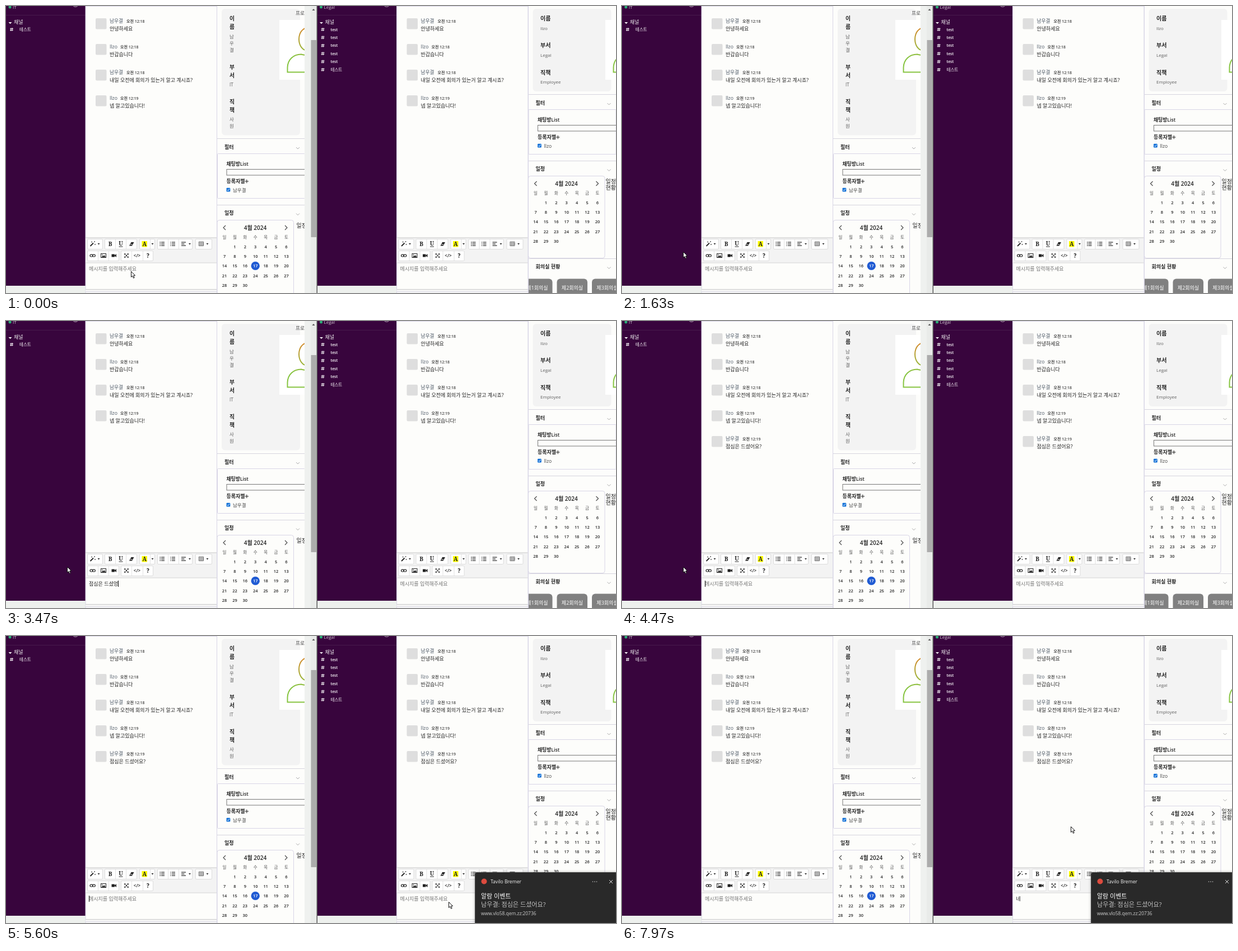
Write an HTML page with a canvas that moves like this. It is 1089 by 514 pixels and loops after 8000 ms.

```html
<!DOCTYPE html>
<html lang="ko">
<head>
<meta charset="utf-8">
<style>
html, body { margin: 0; width: 100%; height: 100%; overflow: hidden; background: #fdfdfb; }
canvas { display: block; width: 1089px; height: 514px; }
</style>
</head>
<body>
<canvas id="stage" width="1089" height="514"></canvas>
<script>
const c = document.getElementById('stage').getContext('2d');
const FONT = '"Open Sans","Noto Sans CJK KR","Noto Sans CJK",sans-serif';
const LOOP = 8000, SHIFT = 555.5, BLINK = 530;
const KIM = '남우결', GUEST = 'Ilzo';
const INK = '#222', GREY = '#606060', EDGE = '#d8d5e6', PAPER = '#fdfdfb';
const SENT = 4150, TOAST = 4520, REFOCUS = 5690;

const DRAFT = ['ㅈ', '저', '점', '점ㅅ', '점시', '점심', '점심ㅇ', '점심으', '점심은', '점심은 ',
  '점심은 ㄷ', '점심은 드', '점심은 듯', '점심은 드셔', '점심은 드셨', '점심은 드셨ㅇ',
  '점심은 드셨어', '점심은 드셨엉', '점심은 드셨어요', '점심은 드셨어요?'];
const TYPE_START = 1980, TYPE_STEP = 84;

const CHAT = [
  [KIM, '오전 12:18', '안녕하세요'],
  [GUEST, '오전 12:18', '반갑습니다'],
  [KIM, '오전 12:18', '내일 오전에 회의가 있는거 알고 계시죠?'],
  [GUEST, '오전 12:19', '넵 알고있습니다!'],
  [KIM, '오전 12:19', '점심은 드셨어요?']
];

// time, x, y of the pointer tip
const PATH = [
  [250, 223, 475], [900, 109, 440], [4540, 109, 440], [4690, 463, 431], [4730, 512, 427],
  [5100, 750, 470], [5400, 790, 476], [5780, 790, 476], [6120, 801, 341]
];

function text(s, x, y, size, color = INK, weight = 400, align = 'left') {
  c.font = `${weight} ${size}px ${FONT}`;
  c.textAlign = align;
  c.fillStyle = color;
  c.fillText(s, x, y + size * 0.37);
}

function rect(x, y, w, h, color) {
  c.fillStyle = color;
  c.fillRect(x, y, w, h);
}

function box(x, y, w, h, r, fill, stroke) {
  c.beginPath();
  c.roundRect(x, y, w, h, r);
  if (fill) { c.fillStyle = fill; c.fill(); }
  if (stroke) { c.strokeStyle = stroke; c.lineWidth = 1; c.stroke(); }
}

function disc(x, y, r, color) {
  c.beginPath();
  c.arc(x, y, r, 0, Math.PI * 2);
  c.fillStyle = color;
  c.fill();
}

function trace(points, closed) {
  c.beginPath();
  for (let i = 0; i < points.length; i += 2) c.lineTo(points[i], points[i + 1]);
  if (closed) c.closePath();
}

function stroke(points, color = INK, width = 1) {
  trace(points);
  c.strokeStyle = color;
  c.lineWidth = width;
  c.stroke();
}

function fill(points, color = INK) {
  trace(points, true);
  c.fillStyle = color;
  c.fill();
}

function clipped(x, y, w, h, draw) {
  c.save();
  c.beginPath();
  c.rect(x, y, w, h);
  c.clip();
  draw();
  c.restore();
}

const caretDown = (x, y) => fill([x - 2, y - 1, x + 2, y - 1, x, y + 1.5]);
const chevron = (x, y) => stroke([x - 3, y - 1.5, x, y + 1.5, x + 3, y - 1.5], '#aaa');

function hash(x, y) {
  stroke([x - 0.8, y - 3, x - 1.6, y + 3], '#fff', 0.9);
  stroke([x + 1.6, y - 3, x + 0.8, y + 3], '#fff', 0.9);
  stroke([x - 2.8, y - 1.3, x + 3, y - 1.3], '#fff', 0.9);
  stroke([x - 3, y + 1.3, x + 2.8, y + 1.3], '#fff', 0.9);
}

function sidebar(team, channels) {
  rect(0, 0, 142, 501, '#38053d');
  rect(0, 501, 142, 13, '#edf0ed');
  rect(0, 16, 142, 1, '#471a4c');
  disc(7, 2, 2.5, '#2bac76');
  text(team, 12, 2, 8, '#cfc3cf');
  c.beginPath();
  c.arc(124, -4, 5.5, 0, Math.PI);
  c.strokeStyle = '#b9a8bb';
  c.lineWidth = 1;
  c.stroke();
  fill([4.5, 29, 10.5, 29, 7.5, 32], '#fff');
  text('채널', 14, 28.5, 9, '#eee');
  channels.forEach((name, i) => {
    const y = 42 + i * 14.4;
    hash(10, y);
    text(name, 24, y, name === 'test' ? 6.8 : 7.5, '#fff', name === 'test' ? 600 : 500);
  });
}

function lines(x, y, gap, dotted) {
  for (let i = -1; i < 2; i++) {
    const left = dotted ? x - 2 : x - 4;
    rect(left, y + i * 3 - 0.5, dotted ? 6 : i ? 8 : 5.5, 1.2, INK);
    if (dotted) rect(x - 4.5, y + i * 3 - 0.6, gap, 1.4, INK);
  }
}

function toolbar() {
  rect(142, 415, 234, 45, '#f3f3f3');
  rect(142, 414.5, 234, 1, '#c8c8c8');
  rect(142, 459.5, 234, 1, '#d6d6d6');
  const groups = [[145, 28, 417], [176, 58, 417], [238, 28, 417], [270, 63, 417], [338, 30, 417],
    [145, 57, 438], [205, 58, 438]];
  for (const [x, w, y] of groups) box(x + 0.5, y + 0.5, w - 1, 18, 1.5, '#fff', '#dcdcdc');
  for (const x of [195.5, 214.5, 257.5, 289.5, 308.5]) rect(x - 0.5, 418, 1, 17, '#e2e2e2');
  for (const x of [164, 183, 224, 244]) rect(x, 439, 1, 17, '#e2e2e2');
  for (const x of [165.5, 261.5, 328, 359.5]) caretDown(x, 426);

  stroke([150.5, 430, 156, 424.5], INK, 1.8);
  for (const [x, y] of [[153, 422.5], [158, 422], [159, 427]]) rect(x - 0.7, y - 0.7, 1.5, 1.5, INK);
  c.textAlign = 'center';
  c.fillStyle = INK;
  c.font = 'bold 10px "Noto Serif","Liberation Serif",serif';
  c.fillText('B', 186, 429.7);
  c.fillText('U', 205, 429.2);
  rect(201.5, 430.5, 7, 1, INK);
  fill([220, 429.5, 223.5, 423, 228.5, 423, 225, 429.5]);
  stroke([222, 427, 225.5, 427], '#fff', 1);
  rect(242.5, 421, 9.5, 10.5, '#ffff00');
  c.fillStyle = INK;
  c.fillText('A', 247.2, 430);
  lines(279, 426, 1.5, true);
  lines(298, 426, 1.1, true);
  lines(317, 426, 0, false);
  c.strokeStyle = '#444';
  c.lineWidth = 0.8;
  c.strokeRect(344.5, 422.5, 8, 7);
  stroke([344.5, 425, 352.5, 425, 352.5, 427.3, 344.5, 427.3], '#444', 0.6);
  stroke([347.2, 422.5, 347.2, 429.5], '#444', 0.6);
  stroke([349.9, 422.5, 349.9, 429.5], '#444', 0.6);

  for (const x of [150, 154.3]) {
    c.beginPath();
    c.roundRect(x, 445.2, 5, 3.8, 1.9);
    c.strokeStyle = INK;
    c.lineWidth = 1.2;
    c.stroke();
  }
  c.lineWidth = 1;
  c.strokeRect(169.5, 443.5, 9, 7);
  fill([170.5, 449.7, 173, 446.5, 174.5, 448, 176, 446, 177.8, 449.7]);
  disc(172, 445.5, 0.8, INK);
  rect(188.5, 444.5, 5.5, 5, INK);
  fill([193.5, 447, 197, 444, 197, 450]);
  stroke([212, 444, 218, 450], INK, 1);
  stroke([218, 444, 212, 450], INK, 1);
  for (const sx of [-1, 1]) for (const sy of [-1, 1]) {
    const x = 215 + sx * 3.8, y = 447 + sy * 3.8;
    fill([x, y, x - sx * 2.8, y, x, y - sy * 2.8]);
  }
  text('</>', 234, 447, 8, INK, 600, 'center');
  text('?', 253.5, 447, 10, INK, 700, 'center');
}

function chat(count, draft, caretOn) {
  rect(142, 0, 235, 514, PAPER);
  rect(142, 0, 235, 1, EDGE);
  rect(141.5, 0, 1, 514, EDGE);
  CHAT.slice(0, count).forEach(([name, time, body], i) => {
    const y = i * 46;
    box(160, 22 + y, 19.5, 19.5, 2, '#dedede');
    text(name, 185, 26.5 + y, 8.7, '#4c5866');
    text(time, name === KIM ? 215 : 204, 27 + y, 7, '#444', 600);
    text(body, 185, 40.5 + y, 9, INK);
  });
  toolbar();
  text(draft || '메시지를 입력해주세요', 148, 470.5, 9, draft ? INK : '#757575');
  if (caretOn) {
    const w = draft ? c.measureText(draft).width : 0;
    rect(Math.round(148 + w), 465, 1, 11, '#000');
  }
  rect(142, 507, 235, 1, '#ccc');
  rect(142, 508, 235, 4, '#f4f4f4');
  rect(142, 511.5, 235, 1, EDGE);
  rect(376, 0, 1, 514, EDGE);
}

function avatar(dx) {
  c.save();
  c.translate(dx, 0);
  rect(488, 25, 107, 107, '#fff');
  const g = c.createLinearGradient(0, 39, 0, 92);
  g.addColorStop(0, '#d58a2c');
  g.addColorStop(1, '#86c440');
  c.strokeStyle = g;
  c.lineWidth = 2;
  c.beginPath();
  c.ellipse(537, 59.5, 14, 20, 0, 0, Math.PI * 2);
  c.stroke();
  c.beginPath();
  c.moveTo(570, 118.5);
  c.lineTo(502.5, 118.5);
  c.lineTo(502.5, 110);
  c.bezierCurveTo(503, 96, 513, 86.5, 527, 86.5);
  c.quadraticCurveTo(531, 88, 537, 88);
  c.stroke();
  c.restore();
}

function calendar(today, hover) {
  box(377, 383.5, 136.5, 147, 4, PAPER, EDGE);
  text('4월 2024', 445, 397, 10, INK, 600, 'center');
  stroke([392, 393, 388, 397, 392, 401], '#444', 1.1);
  stroke([498, 393, 502, 397, 498, 401], '#444', 1.1);
  const colX = i => 390 + i * 18.4;
  [...'일월화수목금토'].forEach((d, i) => text(d, colX(i), 414, 7.5, '#555', 400, 'center'));
  for (let d = 1; d <= 30; d++) {
    const x = colX(d % 7), y = 431 + Math.floor(d / 7) * 17.35;
    if (d === today) disc(x, y - 0.3, 7.7, '#205bd3');
    else if (d === hover) disc(x, y - 0.3, 7.7, '#e9e9ee');
    text(d, x, y, 7.4, d === today ? '#fff' : INK, 600, 'center');
  }
}

function panel(user, today, hover) {
  for (const y of [237, 356, 531]) rect(377, y, 200, 1, '#d6d4de');
  for (const [s, y] of [['필터', 252.5], ['일정', 371], ['회의실 현황', 546]]) {
    text(s, 390, y, 9, INK, 600);
    chevron(521, y + 2);
  }
  box(377.5, 264.5, 156, 80, 1, null, EDGE);
  text('채팅방List', 393.5, 283, 8.8, INK, 600);
  c.strokeStyle = '#777';
  c.lineWidth = 1;
  c.strokeRect(394, 292.5, 160, 10.5);
  text('등록자별', 393.5, 314, 9, INK, 600);
  stroke([426.5, 314, 433, 314], INK, 1);
  stroke([429.8, 310.8, 429.8, 317.2], INK, 1);
  box(393.5, 325.7, 6.8, 6.8, 1.2, '#1272d8');
  stroke([394.8, 329.2, 396.3, 330.8, 399, 327.4], '#fff', 1);
  text(user, 405, 330, 8.5, '#444');
  calendar(today, hover);
  for (let i = 0; i < 3; i++) {
    const x = 365.5 + i * 62.5;
    box(x, 567.5, 54.5, 40, 6, '#808080');
    text(`제${i + 1}회의실`, x + 27.5, 584, 9, '#fff', 400, 'center');
  }
}

function leftPanel(hover) {
  rect(377, 0, 156, 514, PAPER);
  box(385, 5, 140, 226.5, 6, '#f3f3f3');
  const column = (s, y, gap, size, color, weight) =>
    [...s].forEach((ch, i) => text(ch, 399, y + i * gap, size, color, weight));
  column('이름', 22.5, 15, 9.8, INK, 600);
  column(KIM, 55, 12, 8.5, GREY);
  column('부서', 109, 15, 9.8, INK, 600);
  text('IT', 399, 141, 8.3, GREY);
  column('직책', 171, 15, 9.8, INK, 600);
  column('사원', 203, 12, 8.5, GREY);
  avatar(0);
  text('프로필', 517, 13, 8.7, '#444');
  panel(KIM, 17, hover);
  text('일정', 518.5, 393, 10, INK);
}

function rightPanel() {
  rect(932, 0, 157, 514, PAPER);
  box(940.5, 5, 140, 148, 6, '#f3f3f3');
  [['이름', GUEST], ['부서', 'Legal'], ['직책', 'Employee']].forEach(([head, value], i) => {
    text(head, 954, 22.5 + i * 48.2, 10, INK, 600);
    text(value, 954, 40.5 + i * 48, 8, GREY);
  });
  avatar(582);
  c.save();
  c.translate(SHIFT, -79);
  panel(GUEST);
  c.restore();
  text('일정', 1070.5, 314, 10, INK);
  text('현황', 1070.5, 325, 10, INK);
}

function scrollbar() {
  rect(533, 0, 11, 514, '#eff1ef');
  rect(544, 0, 11, 514, '#e9ebe9');
  rect(544.5, 61, 9.5, 353, '#acacac');
  fill([546.5, 8, 551.5, 8, 549, 5], '#555');
  rect(554.5, 0, 1.5, 514, '#5a5a5a');
}

function toast(t) {
  if (t < TOAST) return;
  const k = Math.min(1, (t - TOAST) / 180);
  c.save();
  c.translate(256 * Math.pow(1 - k, 3), 0);
  c.shadowColor = 'rgba(0,0,0,.3)';
  c.shadowBlur = 5;
  box(837, 423, 262, 100, 4, '#292929');
  c.shadowColor = 'transparent';
  box(837.5, 423.5, 262, 100, 4, null, '#444');
  disc(853.5, 439.5, 5, '#dd4b3e');
  text('Tavilo Bremer', 865, 439.5, 8.6, '#f2f2f2');
  for (let i = -1; i < 2; i++) disc(1051 + i * 3.5, 440, 0.8, '#ccc');
  stroke([1077, 437, 1083, 443], '#ddd', 1);
  stroke([1083, 437, 1077, 443], '#ddd', 1);
  text('알람 이벤트', 848, 466, 11, '#fff', 500);
  text(KIM + ': 점심은 드셨어요?', 848, 480.5, 11.1, '#c0c0c0');
  text('www.vlo58.qem.zz:20736', 848, 497, 8.4, '#cfcfcf');
  c.restore();
}

function pointerAt(t) {
  let a = PATH[0];
  for (const b of PATH) {
    if (t < b[0]) {
      if (b === a) break;
      const k = (t - a[0]) / (b[0] - a[0]);
      const slow = b[0] - a[0] > 300 ? k * k * (3 - 2 * k) : k;
      return [a[1] + (b[1] - a[1]) * slow, a[2] + (b[2] - a[2]) * slow];
    }
    a = b;
  }
  return [a[1], a[2]];
}

function hoveredDay([x, y]) {
  const col = Math.round((x - 390) / 18.4), row = Math.round((y - 431) / 17.35);
  if (col < 0 || col > 6 || row < 0 || row > 4) return 0;
  return row * 7 + col;
}

function pointer([x, y], hand) {
  c.save();
  c.translate(x, y);
  c.lineJoin = 'round';
  if (hand) trace([0, 1, 1.5, 0, 2.8, 1, 3, 4.5, 8, 6, 8.5, 8, 7, 12.5, 2.5, 12.5, -2, 8, -1.3, 7, 0.3, 8], true);
  else trace([0.5, 0.5, 0.5, 10.5, 2.8, 8.4, 4.5, 12.3, 6.2, 11.6, 4.6, 7.8, 7.6, 7.6], true);
  c.fillStyle = '#fff';
  c.fill();
  c.strokeStyle = '#111';
  c.lineWidth = 1;
  c.stroke();
  c.restore();
}

const blinkOn = (t, from) => t >= from && Math.floor((t - from) / BLINK) % 2 === 0;

function draw(t) {
  const step = Math.floor((t - TYPE_START) / TYPE_STEP);
  const typing = t >= TYPE_START && t < SENT;
  const last = Math.min(step, DRAFT.length - 1);
  const draft = typing ? DRAFT[last] : '';
  const keyTime = t >= SENT ? SENT : typing ? TYPE_START + last * TYPE_STEP : 20;
  const reply = t < 7080 ? '' : t < 7200 ? 'ㄴ' : '네';
  const replyKey = reply ? (reply === '네' ? 7200 : 7080) : REFOCUS;
  const count = t < SENT ? 4 : 5;
  const day = hoveredDay(pointerAt(t - 40));

  rect(0, 0, 1089, 514, PAPER);
  sidebar('IT', ['테스트']);
  chat(count, draft, t < REFOCUS && blinkOn(t, keyTime));
  clipped(377, 0, 156, 514, () => leftPanel(day));
  scrollbar();

  c.save();
  c.translate(SHIFT, 0);
  clipped(0.5, 0, 540, 514, () => {
    sidebar('Legal', ['test', 'test', 'test', 'test', 'test', '테스트']);
    chat(count, reply, blinkOn(t, replyKey));
  });
  c.restore();
  clipped(932, 0, 157, 514, rightPanel);
  rect(932, 0, 1, 514, EDGE);

  toast(t);
  pointer(pointerAt(t), day > 0);
}

function frame() {
  draw(performance.now() % LOOP);
  requestAnimationFrame(frame);
}
frame();
</script>
</body>
</html>
```
